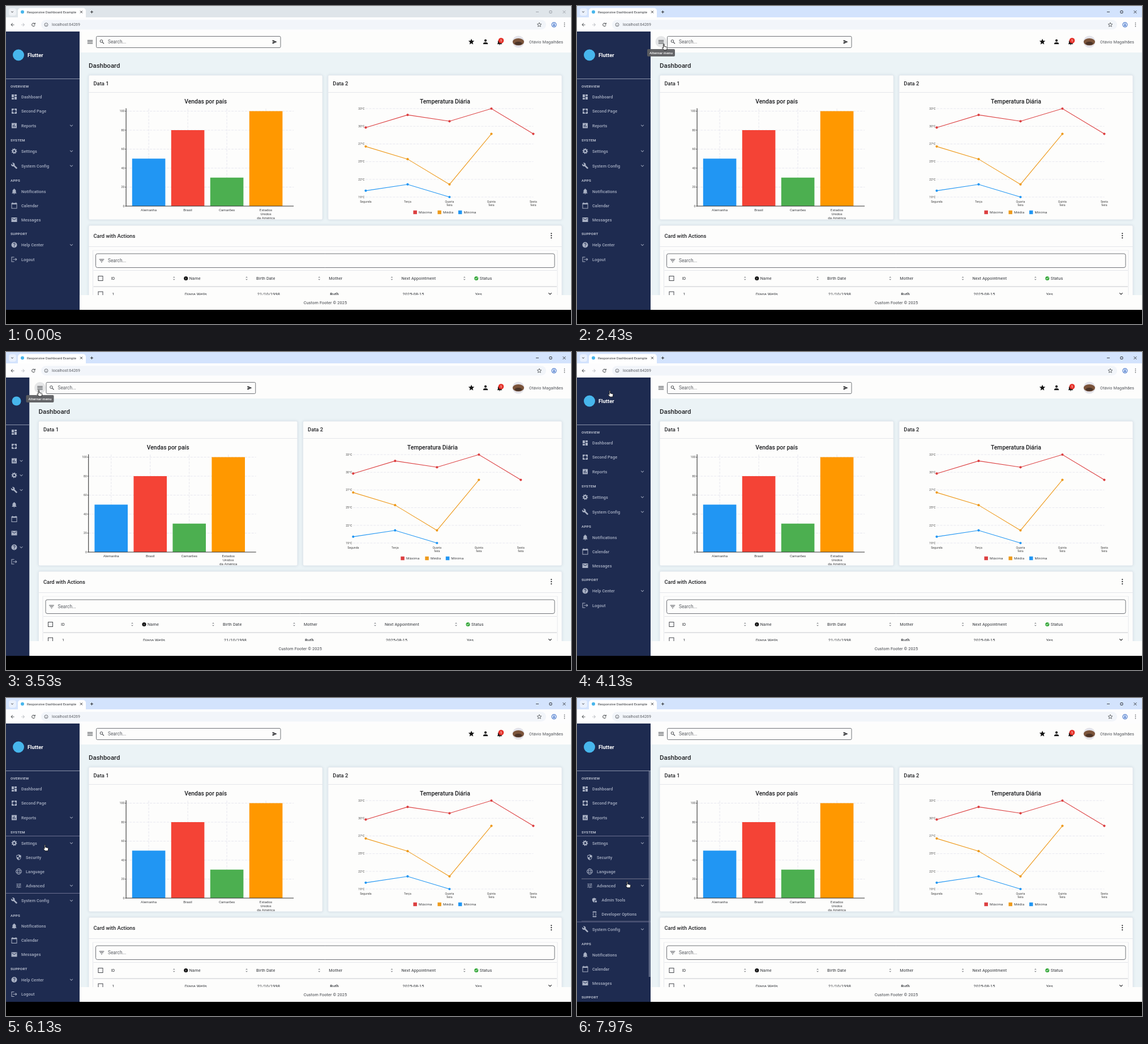
An HTML page with a canvas for the animation above (8000 ms loop, 998x561 px).

```html
<!DOCTYPE html>
<html lang="en">
<head>
<meta charset="utf-8">
<title>Dashboard</title>
<style>
html, body { margin: 0; width: 100%; height: 100%; overflow: hidden; background: #000; }
canvas { display: block; width: 998px; height: 561px; }
</style>
</head>
<body>
<canvas id="stage"></canvas>
<script>
const LOOP = 8000, WIDE = 130, NARROW = 41.5;
const canvas = document.getElementById('stage');
const ctx = canvas.getContext('2d');
const dpr = window.devicePixelRatio || 1;
canvas.width = 998 * dpr;
canvas.height = 561 * dpr;

const C = {
  navy: '#1e2b50', pale: '#a9b1c4', card: '#fdfdfc', page: '#ebf3f6', edge: '#e1e8ee',
  ink: '#202124', grey: '#5d6066', grid: '#e2e2ec', red: '#f44336', orange: '#ff9800',
  blue: '#2196f3', green: '#4caf50', logo: '#47b6ec'
};

// Icon outlines on a 24-unit grid, filled even-odd.
const DISC = 'M2 12a10 10 0 1 0 20 0a10 10 0 1 0-20 0z';
const ICONS = {
  dash: 'M3 13h8V3H3zM3 21h8v-6H3zM13 21h8V11h-8zM13 3v6h8V3z',
  pages: 'M3 3h8v5l-4-1 1 4H3zM13 3h8v8h-5l1-4-4 1zM3 13h5l-1 4 4-1v5H3zM21 13v8h-8v-5l4 1-1-4z',
  report: 'M3 3h18v18H3zM7 10v7h2v-7zM11 7v10h2V7zM15 13v4h2v-4z',
  wrench: 'M22.7 19l-9.1-9.1c.9-2.3.4-5-1.5-6.9-2-2-5-2.4-7.4-1.3L9 6 6 9 1.6 4.7C.4 7.1.9 10.1 2.9 12.1c1.9 1.9 4.6 2.4 6.9 1.5l9.1 9.1 1.4 0 2.3-2.3z',
  bell: 'M10 20h4a2 2 0 0 1-4 0zM18 16v-5c0-3-1.6-5.6-4.5-6.3V4a1.5 1.5 0 0 0-3 0v.7C7.6 5.4 6 8 6 11v5l-2 2v1h16v-1z',
  calendar: 'M2 3h3V1h2v2h10V1h2v2h3v20H2zM4 8v13h16V8z',
  mail: 'M2 4h20v16H2zM4 6v2l8 5 8-5V6l-8 5z',
  help: DISC + 'M11 17v2h2v-2zM11 15h2c0-3 3-3 3-6a4 4 0 0 0-8 0h2a2 2 0 0 1 4 0c0 2-3 2.500-3 6z',
  logout: 'M17 7l-1.4 1.4 2.600 2.600H8v2h10.200l-2.600 2.600L17 17l5-5zM12 3H2v18h10v-2H4V5h8z',
  shield: 'M12 1L3 5v6c0 5.500 3.800 10.700 9 12 5.200-1.300 9-6.500 9-12V5zM12 12h7c-.5 4-3.300 7.800-7 9zM12 12H5V6.300l7-3.100z',
  tune: 'M3 17v2h6v-2zM3 5v2h10V5zM13 21v-2h8v-2h-8v-2h-2v6zM7 9v2H3v2h4v2h2V9zM21 13v-2H11v2zM15 9h2V7h4V5h-4V3h-2z',
  admin: 'M18 11V6.300L10.500 3 3 6.300v5c0 4.500 3.200 8.700 7.500 9.700l1.500-.5a6 6 0 0 1 6-9.500zM13 17a4 4 0 1 0 8 0a4 4 0 1 0-8 0z',
  dev: 'M5 7V1h14v6h-2V5H7v2zM5 17v6h14v-6h-2v2H7v-2zM15.400 16.600L20 12l-4.600-4.600L14 8.800l3.200 3.200-3.200 3.200zM8.600 16.600L4 12l4.600-4.600L10 8.800 6.800 12l3.200 3.200z',
  star: 'M12 17.300L18.200 21l-1.700-7L22 9.200l-7.200-.6L12 2 9.200 8.600 2 9.200 7.500 14 5.800 21z',
  person: 'M8 8a4 4 0 1 0 8 0a4 4 0 1 0-8 0zM4 20v-2c0-2.700 5.300-4 8-4s8 1.300 8 4v2z',
  menu: 'M3 18h18v-2H3zM3 13h18v-2H3zM3 6v2h18V6z',
  filter: 'M10 18h4v-2h-4zM3 6v2h18V6zM6 13h12v-2H6z',
  send: 'M2 21L23 12 2 3v7l15 2-15 2z',
  down: 'M16.600 8.600L12 13.200 7.400 8.600 6 10l6 6 6-6z',
  sort: 'M12 5.800L15.200 9l1.400-1.400L12 3 7.400 7.600 8.800 9zM12 18.200L8.800 15l-1.400 1.400L12 21l4.600-4.600-1.400-1.400z',
  info: DISC + 'M11 7v2h2V7zM11 11v6h2v-6z',
  check: DISC + 'M10 17l-5-5 1.400-1.400 3.600 3.600 7.600-7.600L19 8z',
  box: 'M3 3h18v18H3zM5 5v14h14V5z',
  back: 'M20 11H7.800l5.600-5.600L12 4l-8 8 8 8 1.400-1.400L7.800 13H20z',
  hand: 'M9 2c2 0 2 1 2 2v6l7 2c2 .5 2.500 1.500 2.500 3l-1.500 7H10l-6-7c1-2 3-1 4 0V4c0-1 0-2 1-2z',
  arrow: 'M5 1v18l4-4 3 7 3-1.500-3-6.500h6z'
};
for (const k in ICONS) ICONS[k] = new Path2D(ICONS[k]);

ICONS.gear = (() => {
  const p = new Path2D();
  for (let i = 0; i < 32; i++) {
    const a = (i + 0.5) * Math.PI / 16, r = i % 4 < 2 ? 10 : 7.4;
    p.lineTo(12 + r * Math.cos(a), 12 + r * Math.sin(a));
  }
  p.closePath();
  p.moveTo(15.5, 12);
  p.arc(12, 12, 3.5, 0, 7);
  return p;
})();

const clamp = v => Math.max(0, Math.min(1, v));
const ease = p => p * p * (3 - 2 * p);
const ramp = (t, from, to) => ease(clamp((t - from) / (to - from)));
const within = (t, a, b) => t >= a && t < b;

function rect(x, y, w, h, fill, r = 0, stroke) {
  ctx.beginPath();
  ctx.roundRect(x, y, w, h, r);
  if (fill) { ctx.fillStyle = fill; ctx.fill(); }
  if (stroke) { ctx.strokeStyle = stroke; ctx.stroke(); }
}
function disc(x, y, r, fill, ry = r) {
  ctx.beginPath();
  ctx.ellipse(x, y, r, ry, 0, 0, 7);
  ctx.fillStyle = fill;
  ctx.fill();
}
function path(points, color, width = 1, dash = []) {
  ctx.beginPath();
  points.forEach(p => ctx.lineTo(p[0], p[1]));
  ctx.strokeStyle = color;
  ctx.lineWidth = width;
  ctx.setLineDash(dash);
  ctx.stroke();
  ctx.setLineDash([]);
  ctx.lineWidth = 1;
}
const line = (x1, y1, x2, y2, ...style) => path([[x1, y1], [x2, y2]], ...style);

// y is the middle of the capital letters
function text(s, x, y, size, color, { weight = 400, align = 'left', gap = 0 } = {}) {
  ctx.font = `${weight} ${size}px Roboto, sans-serif`;
  ctx.letterSpacing = gap + 'px';
  ctx.textAlign = align;
  ctx.fillStyle = color;
  ctx.fillText(s, x, y + size * 0.355);
}
function icon(name, x, y, size, color, outline) {
  ctx.save();
  ctx.translate(x - size / 2, y - size / 2);
  ctx.scale(size / 24, size / 24);
  ctx.fillStyle = color;
  ctx.fill(ICONS[name], 'evenodd');
  if (outline) { ctx.strokeStyle = outline; ctx.lineWidth = 1.7; ctx.stroke(ICONS[name]); }
  ctx.restore();
}
function clip(x, y, w, h, draw) {
  ctx.save();
  ctx.beginPath();
  ctx.rect(x, y, w, h);
  ctx.clip();
  draw();
  ctx.restore();
}
function ring(x, y, rx, ry, color, from = 0, to = 2 * Math.PI, width = 1) {
  ctx.beginPath();
  ctx.ellipse(x, y, rx, ry, 0, from, to);
  ctx.strokeStyle = color;
  ctx.lineWidth = width;
  ctx.stroke();
  ctx.lineWidth = 1;
}
function magnifier(x, y, color) {
  ring(x - 1, y - 1, 2.3, 2.3, color);
  line(x + 0.8, y + 0.8, x + 3.5, y + 3.5, color, 1.1);
}

function browser(active) {
  const ctl = active ? '#303338' : '#9a9ea6';
  rect(0, 0, 998, 22, active ? '#d3e3fd' : '#dfe5ea');
  rect(5, 4, 13, 13, active ? '#eaf1fd' : '#eff2f6', 4);
  icon('down', 11, 10.5, 8, C.ink);
  rect(21, 3.5, 120, 20, '#fff', [5, 5, 0, 0]);
  disc(29, 10.5, 3, C.logo);
  text('Responsive Dashboard Example', 37, 10.7, 6.1, '#33363b');
  line(131, 8.5, 135, 12.5, C.ink, 0.9);
  line(135, 8.5, 131, 12.5, C.ink, 0.9);
  line(149, 10.5, 154, 10.5, C.ink, 0.9);
  line(151.5, 8, 151.5, 13, C.ink, 0.9);
  line(936, 10.5, 941, 10.5, ctl, 0.9);
  rect(960, 8.5, 4, 4, null, 0.5, ctl);
  line(983.5, 8, 988.5, 13, ctl, 0.9);
  line(988.5, 8, 983.5, 13, ctl, 0.9);

  rect(0, 20, 998, 25, '#fdfdfe');
  rect(62, 24.5, 892, 17, '#f2f5fa', 8.5);
  icon('back', 11.5, 33, 9, '#3c4043');
  ctx.save();
  ctx.translate(30, 33);
  ctx.scale(-1, 1);
  icon('back', 0, 0, 9, '#b4b7bc');
  ctx.restore();
  ring(48.5, 33, 2.8, 2.8, '#3c4043', 0.3, 5.6);
  path([[51.3, 29.6], [51.3, 32], [48.9, 32]], '#3c4043');
  ring(71, 33, 3, 3, '#50545a', 0, 7, 0.8);
  line(71, 32.6, 71, 34.8, '#50545a', 0.8);
  text('localhost:64269', 81, 33, 7, C.grey);
  ctx.save();
  ctx.translate(942 - 4.5, 33 - 4.5);
  ctx.scale(0.375, 0.375);
  ctx.strokeStyle = '#3c4043';
  ctx.lineWidth = 2;
  ctx.stroke(ICONS.star);
  ctx.restore();
  disc(968, 33, 4.5, '#2f63c0');
  disc(968, 33, 3.6, '#dce8fb');
  icon('person', 968, 33, 6, '#2f63c0');
  for (const y of [30, 33, 36]) disc(986.5, y, 0.8, '#3c4043');
}

function topBar(w, hover) {
  rect(w, 45, 998 - w, 37, C.card);
  if (hover) disc(w + 18.5, 63, 10, '#e5e6e7');
  icon('menu', w + 18.5, 63.3, 12.5, '#33363b');
  const left = w + 29.5, right = 420 + w / 2;
  rect(left, 53.5, right - left, 20, C.card, 2, '#6f7277');
  magnifier(left + 10, 63, '#44474c');
  text('Search...', left + 20.5, 63.3, 8.32, C.grey);
  icon('send', right - 10.5, 63.3, 9, C.ink);
  icon('star', 822, 63, 12.5, '#111');
  icon('person', 847, 63, 12.5, '#111');
  icon('bell', 872, 63.5, 12.5, '#111');
  disc(874.5, 61, 4.8, '#e53129');
  text('5', 874.5, 61, 5.2, '#fff', { align: 'center' });
  disc(905, 63, 10.5, '#e3e3ea');
  disc(905, 63.3, 10, '#7b543b', 6.3);
  disc(905, 66, 6.5, '#4b3428', 3);
  text('Otávio Magalhães', 924, 63.3, 7.28, '#4e5156', { gap: 0.13 });
}

function card(x, y, right, bottom, title, split) {
  ctx.shadowColor = 'rgba(60,80,110,.16)';
  ctx.shadowBlur = 5 * dpr;
  rect(x, y, right - x, bottom - y, C.card, 2);
  ctx.shadowBlur = 0;
  ctx.shadowColor = 'transparent';
  rect(x, y, right - x, bottom - y, null, 2, C.edge);
  line(x, split, right, split, '#e4e6ea');
  text(title, x + 8.5, (y + split) / 2 - 0.3, 9.36, C.ink, { weight: 500 });
}

function barChart(cx) {
  const x0 = cx - 140.5, yOf = v => 353 - v * 1.675;
  const small = { align: 'right' };
  text('Vendas por país', cx, 168.5, 10.4, '#1b1c1f', { weight: 500, align: 'center' });
  for (let v = 0; v <= 100; v += 20) {
    if (v) line(x0, yOf(v), x0 + 296, yOf(v), C.grid, 0.8, [4, 2]);
    line(x0 - 2, yOf(v), x0, yOf(v), '#333', 0.8);
    text(v, x0 - 2.8, yOf(v), 5.2, '#444', small);
  }
  const bars = [
    ['Alemanha', 50, C.blue], ['Brasil', 80, C.red],
    ['Camarões', 30, C.green], ['Estados|Unidos|da América', 100, C.orange]
  ];
  bars.forEach(([label, v, color], i) => {
    const x = x0 + 40 + i * 69;
    line(x, 181, x, 353, C.grid, 0.8, [4, 2]);
    rect(x - 29.3, yOf(v), 58.6, v * 1.675, color);
    label.split('|').forEach((s, n) => text(s, x, 359.5 + n * 7.2, 6.24, '#3c3e42', { align: 'center' }));
  });
  line(x0, 180.5, x0, 353.5, '#333', 1.1);
  line(x0, 353, x0 + 296, 353, '#333', 1.1);
}

function lineChart(cx) {
  const x0 = cx - 140, yOf = v => 337 - (v - 19) * 11.143;
  text('Temperatura Diária', cx, 168.5, 10.4, '#1b1c1f', { weight: 500, align: 'center' });
  for (let i = 0; i < 6; i++) {
    const v = 19 + i * 2.8;
    line(x0, yOf(v), x0 + 296, yOf(v), C.grid, 0.8, [4, 2]);
    text(Math.round(v) + '°C', x0 - 2, yOf(v), 5.2, '#444', { align: 'right' });
  }
  ['Segunda', 'Terça', 'Quarta|feira', 'Quinta|feira', 'Sexta|feira'].forEach((d, i) =>
    d.split('|').forEach((s, n) => text(s, x0 + i * 74, 345.3 + n * 6.3, 5.2, '#444', { align: 'center' })));
  const series = [
    ['Máxima', '#dc3f40', [30, 32, 31, 33, 29], -56],
    ['Média', '#ee9a1c', [27, 25, 21, 29], -13],
    ['Mínima', C.blue, [20, 21, 19], 23.5]
  ];
  for (const [name, color, values, dx] of series) {
    const pts = values.map((v, i) => [x0 + i * 74, yOf(v)]);
    path(pts, color, 1.1);
    pts.forEach(p => disc(p[0], p[1], 2.1, color));
    rect(cx + dx, 360.7, 6.5, 6.5, color);
    text(name, cx + dx + 9.7, 364, 6.24, '#3c3e42', { gap: 0.22 });
  }
}

function table(w) {
  const left = w + 24.5;
  card(w + 16, 387, 982, 530, 'Card with Actions', 424.5);
  for (const y of [401.3, 405.2, 409.1]) disc(963.3, y, 1.1, C.ink);
  line(left - 1, 431, 974, 431, '#eeeff2');
  line(left - 1, 431, left - 1, 510, '#e6e8ec');
  line(974, 431, 974, 510, '#e6e8ec');
  rect(w + 28.5, 437, 940.5 - w, 24.5, C.card, 3, '#6f7277');
  icon('filter', w + 39, 449.3, 11.5, '#44474c');
  text('Search...', w + 50, 449.3, 8.32, C.grey);
  line(left, 466.5, 973, 466.5, '#e2e4e8');
  line(left, 495, 973, 495, '#c5c8cd');
  icon('box', w + 37, 480.5, 12, '#44474c');
  icon('box', w + 37, 508, 12, '#44474c');
  const start = w + 55.5, step = (955 - start) / 6;
  const cols = [
    ['ID', '1'], ['Name', 'Diana Wells', 'info', '#111'], ['Birth Date', '21/10/1998'],
    ['Mother', 'Ruth'], ['Next Appointment', '2025-08-15'], ['Status', 'Yes', 'check', '#35a83a']
  ];
  cols.forEach(([head, cell, mark, color], i) => {
    const x = start + i * step;
    if (mark) icon(mark, x + 4, 480.5, 8.6, color);
    text(head, x + (mark ? 10 : 0), 480.6, 7.28, '#2f3237', { gap: 0.13 });
    text(cell, x + 2, 508, 7.28, '#2f3237', { gap: 0.13, weight: i === 3 ? 500 : 400 });
    if (i < 5) icon('sort', x + step - 17, 480.5, 8, '#55585e');
  });
  icon('down', 961, 507.5, 12, C.ink);
}

const ROWS = [
  ['OVERVIEW', 141.5],
  ['Dashboard', 160.5, 'dash', 141.5], ['Second Page', 185.5, 'pages', 166.5],
  ['Reports', 211, 'report', 192, true],
  ['SYSTEM', 237],
  ['Settings', 256, 'gear', 217.5, true], ['System Config', 282, 'wrench', 243.5, true],
  ['APPS', 308],
  ['Notifications', 327, 'bell', 269.5], ['Calendar', 352, 'calendar', 294.5], ['Messages', 377, 'mail', 319.5],
  ['SUPPORT', 402],
  ['Help Center', 421.5, 'help', 344.5, true], ['Logout', 447, 'logout', 370]
];
const label = (s, x, y) => text(s, x, y, 7.28, C.pale, { weight: 500, gap: 0.13 });

function globe(x, y) {
  ring(x, y, 4.8, 4.8, C.pale);
  ring(x, y, 2.1, 4.8, C.pale, 0, 7, 0.8);
  for (const dy of [-1.7, 1.7]) line(x - 4.4, y + dy, x + 4.4, y + dy, C.pale, 0.8);
}

function submenu(open, deep) {
  const grow = 75.5 * open + 50.5 * deep, edge = `rgba(132,132,166,${0.75 * open})`;
  line(0, 243.5, WIDE, 243.5, edge);
  line(0, 269 + grow, WIDE, 269 + grow, edge);
  clip(0, 268, WIDE, grow, () => {
    icon('shield', 22.5, 281, 11, C.pale);
    label('Security', 35, 281);
    globe(22.5, 306);
    label('Language', 35, 306);
    icon('tune', 22.5, 331, 11, C.pale);
    label('Advanced', 35, 331);
    icon('down', 115.5, 331, 11, C.pale);
    if (!deep) return;
    const rim = `rgba(140,140,158,${0.8 * deep})`;
    line(8, 319, WIDE, 319, rim);
    line(8, 343.5 + 50.5 * deep, WIDE, 343.5 + 50.5 * deep, rim);
    clip(0, 343, WIDE, 50.5 * deep, () => {
      icon('admin', 31, 356.5, 11, C.pale);
      label('Admin Tools', 43.5, 356.5);
      icon('dev', 31, 381.5, 11, C.pale);
      label('Developer Options', 43.5, 381.5);
    });
  });
  if (deep) rect(126.7, 129, 3, 363, `rgba(122,130,155,${0.8 * deep})`);
}

function sidebar(w, open, deep) {
  const compact = w < WIDE - 8;
  rect(0, 45, w, 491, C.navy);
  disc(compact ? 18.5 : 22, 86.5, compact ? 8 : 10, C.logo);
  if (!compact) text('Flutter', 38, 87, 9.36, '#fff', { weight: 700 });
  line(0, 128.5, w, 128.5, '#8a92aa');
  for (const [name, y, mark, tight, chevron] of ROWS) {
    const ry = compact ? tight : y + (y > 260 ? 75.5 * open + 50.5 * deep : 0);
    if (!mark) {
      if (!compact) text(name, 8, ry, 6.24, '#bcc2d0', { weight: 700, gap: 0.22 });
      continue;
    }
    icon(mark, 14.5, ry, 12, C.pale);
    if (!compact) label(name, 27, ry);
    if (chevron) icon('down', compact ? 27 : 115.5, ry, 11, C.pale);
  }
  if (open) submenu(open, deep);
}

// Pointer stops: time, x, y of the fingertip
const STOPS = [
  [1350, 300, 540], [1850, 153.5, 67], [2850, 153.5, 67], [3200, 58, 67.5], [4100, 58, 67.5],
  [4850, 68.5, 262], [5300, 68.5, 262], [5700, 69, 259], [6500, 69, 259], [7050, 89, 324]
];
function pointer(t) {
  if (t < STOPS[0][0]) return;
  let i = STOPS.length - 1;
  while (STOPS[i][0] > t) i--;
  const [t0, ax, ay] = STOPS[i], [t1, bx, by] = STOPS[i + 1] || [LOOP, ax, ay];
  const p = ramp(t, t0, t1), x = ax + (bx - ax) * p, y = ay + (by - ay) * p;
  const hand = within(t, 1800, 2680) || within(t, 3130, 4200) || t > 4550;
  if (hand) icon('hand', x + 1.2, y + 5.3, 13, '#fff', '#111');
  else icon('arrow', x + 3.6, y + 6, 13, '#fff', '#111');
}

function draw(t) {
  const w = WIDE - (WIDE - NARROW) * (ramp(t, 2600, 2800) - ramp(t, 3800, 4000));
  const open = ramp(t, 5930, 6120), deep = ramp(t, 7250, 7450);
  const tip = within(t, 2050, 2640) || within(t, 3250, 3800);
  const hover = within(t, 1820, 2640) || within(t, 3150, 3820);
  const mid = (w + 998) / 2;

  ctx.setTransform(dpr, 0, 0, dpr, 0, 0);
  rect(0, 0, 998, 561, '#000');
  rect(0, 45, 998, 491, C.page);
  topBar(w, hover);
  text('Dashboard', w + 16, 105.3, 11.44, C.ink, { weight: 500 });
  clip(w, 82, 998 - w, 428, () => {
    card(w + 16, 122, mid - 4.8, 377, 'Data 1', 152.5);
    card(mid + 4.8, 122, 982, 377, 'Data 2', 152.5);
    clip(w, 122, 998 - w, 255, () => {
      barChart((w + 11.2 + mid) / 2);
      lineChart((mid + 986.8) / 2);
    });
    table(w);
  });
  rect(w, 510, 998 - w, 26, C.card);
  text('Custom Footer © 2025', mid, 523, 7.28, '#3c3f44', { align: 'center', gap: 0.13 });
  clip(0, 45, w, 491, () => sidebar(w, open, deep));
  browser(t >= 1800);
  if (tip) {
    rect(w - 6, 76, 49, 13, 'rgba(92,93,96,.94)', 2);
    text('Alternar menu', w + 18.5, 82.5, 6.24, '#fff', { weight: 500, align: 'center', gap: 0.1 });
  }
  clip(0, 0, 998, 536, () => pointer(t));
}

const start = performance.now();
function frame() {
  draw((performance.now() - start) % LOOP);
  requestAnimationFrame(frame);
}
frame();
</script>
</body>
</html>
```
